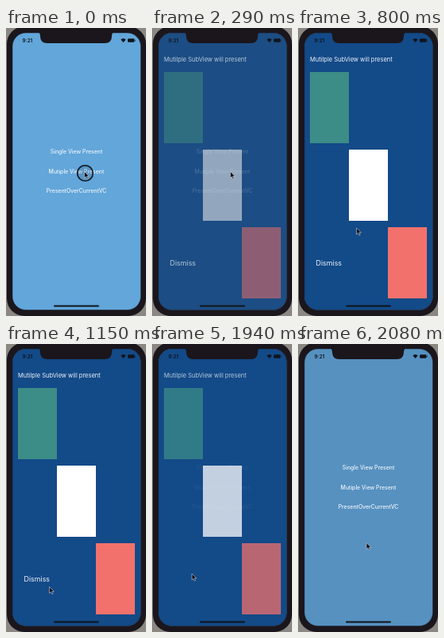
Recreate the animation shown at these times as an HTML page. Size 176x360 px, loop 2.1 s.

```html
<!DOCTYPE html>
<html lang="en">
<head>
<meta charset="utf-8">
<style>
  html, body { margin: 0; width: 100%; height: 100%; overflow: hidden; background: #8b8782; }
  svg { display: block; width: 176px; height: 360px; }
  text { font-family: Inter, "Liberation Sans", sans-serif; fill: #eef4fa; }
  #list text { font-size: 6.9px; font-weight: 500; text-anchor: middle; }
  .screen { x: 8px; y: 6px; width: 161.5px; height: 346.5px; rx: 17px; }
</style>
</head>
<body>
<svg viewBox="0 0 176 360">
  <rect x="1" y="-2" width="175" height="362" rx="22" fill="#1a161c"/>
  <rect class="screen" fill="#62a6da"/>
  <rect id="shade" class="screen" fill="#134a88"/>
  <g id="boxes">
    <rect x="15" y="55" width="49" height="89" fill="#3c8c87"/>
    <rect x="64" y="152" width="49" height="89" fill="#fff"/>
    <rect x="113" y="249" width="49" height="89" fill="#f3716c"/>
  </g>
  <rect id="haze" class="screen" fill="#50463c"/>
  <g id="list">
    <text x="88.5" y="157">Single View Present</text>
    <text x="88.5" y="181.5">Mutiple View Present</text>
    <text x="88.5" y="206">PresentOverCurrentVC</text>
  </g>
  <text id="title" x="15" y="42" font-size="7.5">Mutilple SubView will present</text>
  <text id="dismiss" x="22.5" y="297" font-size="8.9">Dismiss</text>

  <!-- screen edge, notch, status bar, home indicator -->
  <rect class="screen" fill="none" stroke="#1a161c" stroke-opacity=".5"/>
  <path d="M40 5 Q43 6 43 10 Q43 19 52 19 H124 Q133 19 133 10 Q133 6 136 5 Z" fill="#1a161c"/>
  <g fill="#10141c">
    <text x="20.5" y="18" font-size="6.4" font-weight="600" style="fill:#10141c">9:21</text>
    <path d="M144.3 14.6 Q147.5 11.6 150.7 14.6 L147.5 18 Z"/>
    <rect x="153" y="13.3" width="8.4" height="4.4" rx="1.2"/>
    <rect x="161.8" y="14.6" width=".8" height="1.8"/>
    <rect x="60" y="346.6" width="57" height="1.9" rx="1"/>
  </g>

  <g id="pointer">
    <circle id="ring" cx="1" cy="2" r="9.8" fill="#000" fill-opacity=".1" stroke="#111a26" stroke-width="1.6"/>
    <path d="M0 0 V8 L1.9 6.3 L3.2 9.2 L4.6 8.6 L3.3 5.8 H5.8 Z" fill="#0b0d14" stroke="#cfd8e4" stroke-width=".6"/>
  </g>
</svg>
<script>
const LOOP = 2100, STEP = 71.4;
const $ = id => document.getElementById(id);
const show = (id, opacity) => $(id).setAttribute("opacity", opacity);

function ease(k, from, to) {
  const u = Math.min(1, Math.max(0, (k - from) / (to - from)));
  return u * u * (3 - 2 * u);
}

function draw(time) {
  const k = Math.max(0, Math.floor((time % LOOP - 2) / STEP));

  const shade = ease(k, 1, 4.5) - ease(k, 27, 29.6);
  const leave = ease(k, 26, 29);
  const boxes = ease(k, 1, 6.5) - leave;
  const text = ease(k, 1, 5.5);
  show("shade", shade);
  show("boxes", boxes);
  show("haze", shade > 0 && shade < 1 ? .1 : 0);
  show("list", (1 - boxes) ** 2);
  show("title", text - leave);
  show("dismiss", text - ease(k, 24, 27));
  show("ring", k === 0 || k === 25 ? 1 : 0);

  // Down past the button, back onto it, then up to the list.
  const down = ease(k, 5, 16), back = ease(k, 16, 24), up = ease(k, 26.4, 29);
  const x = 98.5 - 44 * down - 10 * back + 41.5 * up;
  const y = 179.5 + 124 * down - 10.5 * back - 44.5 * up;
  $("pointer").setAttribute("transform", `translate(${x} ${y})`);
}

const start = performance.now();
function tick() {
  draw(performance.now() - start);
  requestAnimationFrame(tick);
}
tick();
</script>
</body>
</html>
```
